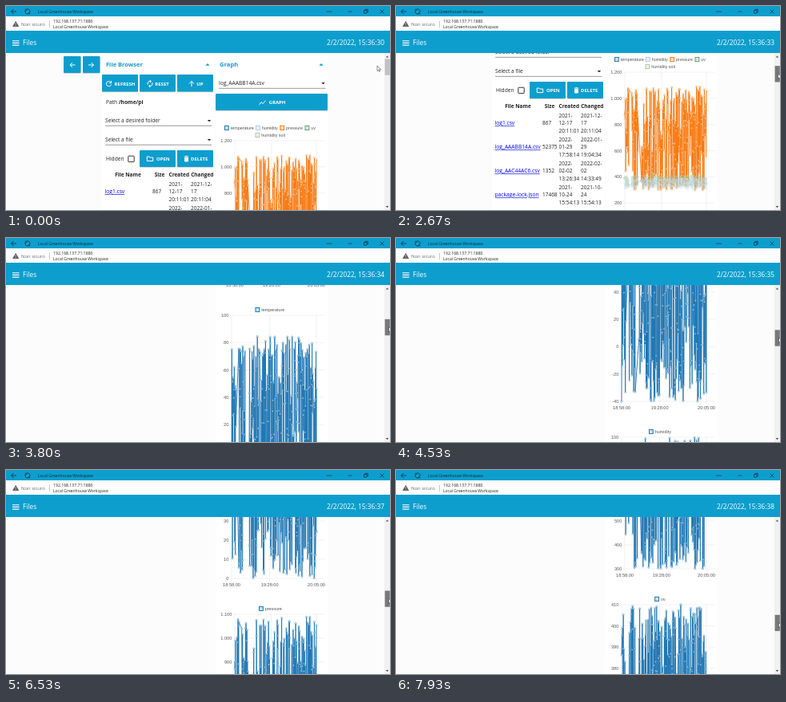
Write an HTML page that moves like this. It is 480x256 px and loops after 8000 ms.

```html
<!DOCTYPE html>
<html lang="en">
<head>
<meta charset="utf-8">
<title>Files</title>
<style>
  html, body { margin: 0; width: 100%; height: 100%; overflow: hidden; background: #fcfcfc; }
  svg { display: block; width: 480px; height: 256px; }
  text { font-family: "Open Sans", "Noto Sans", sans-serif; }
  .chart text { font-family: "Liberation Sans", Arial, sans-serif; }
</style>
</head>
<body>
<svg id="stage" viewBox="0 0 480 256"></svg>
<script>
const BLUE = '#0e9ecd', INK = '#222';

// ---------- drawing helpers ----------
const rect = (x, y, w, h, fill, extra = '') =>
  `<rect x="${x}" y="${y}" width="${w}" height="${h}" fill="${fill}" ${extra}/>`;
const path = (d, stroke, width = 1, fill = 'none', extra = '') =>
  `<path d="${d}" stroke="${stroke}" stroke-width="${width}" fill="${fill}" ${extra}/>`;
const icon = (x, y, d, stroke, width = 1, fill = 'none') =>
  path(d, stroke, width, fill, `transform="translate(${x} ${y})"`);
// y is the visual middle of the line
const text = (x, y, str, size = 6.66, fill = INK, extra = '') =>
  `<text x="${x}" y="${y + size * 0.35}" font-size="${size}" fill="${fill}" ${extra}>${str}</text>`;
const BOLD = 'font-weight="700"', MEDIUM = 'font-weight="500"';
const MID = 'text-anchor="middle"', END = 'text-anchor="end"';

const button = (x, y, w, h) =>
  rect(x, y + 0.8, w, h, '#000', 'rx="1" opacity=".2"') + rect(x, y, w, h, BLUE, 'rx="1"');
const label = (x, y, str) => text(x, y, str, 6, '#fff', `${BOLD} ${MID}`);
const dropdown = (x, y, right, str) =>
  text(x, y, str) + path(`M${x} ${y + 6.3}H${right}`, '#555', 0.6) +
  icon(right - 3, y, 'M-2.2-1H2.2L0 1.3Z', 'none', 0, '#222');

// ---------- sensor data ----------
let seed = 7;
const random = () => (seed = (seed * 16807) % 2147483647) / 2147483647;
// recording sessions as fractions of the time axis, with pauses between them
const SESSIONS = [[0, 0.05], [0.085, 0.16], [0.205, 1]], SPACING = 0.0026;
const times = SESSIONS.flatMap(([from, to]) =>
  Array.from({ length: Math.round((to - from) / SPACING) + 1 }, (_, i) => from + i * SPACING));
const makeSeries = (name, color, low, high) =>
  ({ name, color, points: times.map(t => [t, low + (high - low) * random()]) });
const temperature = makeSeries('temperature', '#1f77b4', -40, 85);
const humidity = makeSeries('humidity', '#aec7e8', 0, 100);
const pressure = makeSeries('pressure', '#f97b14', 300, 1100);
const uv = makeSeries('uv', '#2ca02c', 330, 410);
const soil = makeSeries('humidity soil', '#b4d8b4', 310, 390);

// ---------- charts ----------
function plot(series, color, toX, toY, width, opacity = 1) {
  const xy = series.points.map(([t, v]) => [toX(t).toFixed(1), toY(v).toFixed(1)]);
  const dots = xy.map(([x, y]) => `<circle cx="${x}" cy="${y}" r="1.15"/>`).join('');
  return `<g opacity="${opacity}">` +
    path('M' + xy.map(p => p.join(' ')).join('L'), color, width, 'none', 'stroke-linejoin="bevel"') +
    `<g fill="#fff" fill-opacity=".5" stroke="${color}" stroke-width=".4">${dots}</g></g>`;
}

function legend(x, y, name, color) {
  return rect(x, y - 2.6, 4.8, 5.2, color, `fill-opacity=".22" stroke="${color}" stroke-width="1"`) +
    text(x + 7.3, y, name, 5.4, '#555');
}

function axes({ top, bottom, left, high, low, step }) {
  const toY = v => top + (high - v) / (high - low) * (bottom - top);
  const toX = t => left + t * (388 - left);
  const ticks = [['18:58:00', left], ['19:28:00', left + (388 - left) * 0.45], ['20:05:00', 388]];
  let out = '';
  for (let v = high; v >= low; v -= step) {
    const name = v >= 1000 ? (v / 1000).toFixed(3) : v;
    out += path(`M${left - 3} ${toY(v)}H399`, '#e6e6e6', 0.5) +
      text(left - 3.7, toY(v), name, 5.6, '#555', END);
  }
  for (const [name, x] of ticks)
    out += path(`M${x} ${top}V${bottom + 3}`, '#e2e2e2', 0.5) + text(x, bottom + 8, name, 5.6, '#555', MID);
  return { out, toX, toY };
}

function singleChart(series, legendX, frame) {
  const { out, toX, toY } = axes({ ...frame, bottom: frame.top + 240 });
  return out + legend(legendX, frame.top - 7, series.name, '#1f77b4') +
    plot(series, '#1f77b4', toX, toY, 0.9);
}

function combinedChart() {
  const { out, toX, toY } = axes({ top: 169, bottom: 399, left: 286, high: 1200, low: -200, step: 200 });
  return out +
    legend(273.5, 153, 'temperature', temperature.color) + legend(312.4, 153, 'humidity', humidity.color) +
    legend(342.8, 153, 'pressure', pressure.color) + legend(374, 153, 'uv', '#5f9f78') +
    legend(312, 162, 'humidity soil', '#b5c4ab') +
    plot(temperature, temperature.color, toX, toY, 0.8) +
    plot(humidity, humidity.color, toX, toY, 0.8) +
    plot(pressure, pressure.color, toX, toY, 0.9) +
    plot(uv, '#6da56d', toX, toY, 0.4, 0.6) +
    plot(soil, '#a9cbe0', toX, toY, 0.4, 0.6);
}

// ---------- page ----------
const ARROW_LEFT = 'M3.5 0H-3M0-3L-3 0 0 3';
const files = [
  ['log1.csv', 867, '2021- 12-17 20:11:01', '2021-12- 17 20:11:04'],
  ['log_AAABB14A.csv', 52375, '2022- 01-29 17:58:14', '2022-01- 29 19:04:34'],
  ['log_AAC44AC6.csv', 1352, '2022- 02-02 13:26:34', '2022-02- 02 14:33:49'],
  ['package-lock.json', 17468, '2021- 10-24 15:54:13', '2021-10- 24 15:54:13']
];

function fileTable() {
  const head = [['File Name', 152.5], ['Size', 192], ['Created', 216.3], ['Changed', 245.3]];
  const lines = (x, y, str) => str.split(' ').map((s, i) => text(x, y + (i - 1) * 9.6, s, 6.5)).join('');
  return head.map(([s, x]) => text(x, 212, s, 6.5, INK, `${BOLD} ${MID}`)).join('') +
    files.map(([name, size, created, changed], i) => {
      const y = 233 + i * 30;
      return text(123.5, y, name, 6.7, '#0000ee', 'text-decoration="underline"') +
        text(183, y, size, 6.5) + lines(203.5, y, created) + lines(231, y, changed);
    }).join('');
}

function fileBrowser() {
  return rect(120, 59, 141, 286, '#fff') +
    button(72, 63, 21.5, 21) + icon(83, 74, ARROW_LEFT, '#fff') +
    button(96, 63, 21.5, 21) + icon(106.5, 74, 'M-3.5 0H3M0-3L3 0 0 3', '#fff') +
    text(125, 73, 'File Browser', 7.5, BLUE, BOLD) + icon(252, 73.5, 'M-2.6 1.3H2.6L0-1.4Z', 'none', 0, BLUE) +
    button(120, 86, 45, 21.5) + icon(128.5, 97.5, 'M2.3-2A3.1 3.1 0 1 0 3 1M3-3.6V-.9H.4', '#fff') + label(148.5, 97.5, 'REFRESH') +
    button(167, 86, 45, 21.5) +
    icon(180, 97.5, 'M-2.7 1.3A3 3 0 0 1 1-2.9M2.7-1.3A3 3 0 0 1-1 2.9M-.2-4.6L1.4-2.9-.2-1.3M.2 4.6L-1.4 2.9 .2 1.3', '#fff') +
    label(195, 97.5, 'RESET') +
    button(214, 86, 45, 21.5) + icon(232, 97.5, 'M0 3.7V-3M-3 0L0-3 3 0', '#fff') + label(242.3, 97.5, 'UP') +
    text(125, 121, `Path <tspan ${BOLD}>/home/pi</tspan>`) +
    dropdown(124, 144, 257, 'Select a desired folder') +
    dropdown(124, 168, 257, 'Select a file') +
    text(125, 192, 'Hidden') + rect(152.8, 188.2, 7.4, 7.4, '#fff', 'rx=".6" stroke="#333" stroke-width="1"') +
    button(167, 181, 45, 21) + icon(180, 191.7, 'M-3.7-2.7H-1L0-1.6H3.7V2.8H-3.7Z', '#fff') + label(196.3, 192, 'OPEN') +
    button(214, 181, 45, 21) + icon(225.5, 191.5, 'M-2-.9H2V3.5H-2ZM-2.8-2.4H2.8M-1-3.2H1', '#fff', 0.9, '#fff') + label(241.7, 192, 'DELETE') +
    fileTable();
}

function graphColumn() {
  return rect(262, 59, 140, 1600, '#fff') +
    text(267, 73, 'Graph', 7.6, BLUE, BOLD) + icon(394, 73.5, 'M-2.6 1.3H2.6L0-1.4Z', 'none', 0, BLUE) +
    dropdown(266, 97, 399.5, 'log_AAABB14A.csv') +
    button(262, 110, 140, 21) + icon(320.5, 121.3, 'M-4 2.5L-1.4-.6 .6 1.3 4-2.6', '#fff') + label(339, 121, 'GRAPH') +
    '<g class="chart">' + combinedChart() +
    singleChart(temperature, 312, { top: 445, left: 282, high: 100, low: -40, step: 20 }) +
    singleChart(humidity, 316.5, { top: 730, left: 282, high: 100, low: 0, step: 10 }) +
    singleChart(pressure, 316.5, { top: 1015, left: 286, high: 1100, low: 300, step: 100 }) +
    singleChart(uv, 323.7, { top: 1300, left: 282, high: 410, low: 320, step: 10 }) + '</g>';
}

function browserFrame() {
  const dark = '#0b2e3c', site = 'Local Greenhouse Workspace';
  return rect(0, 0, 480, 13, BLUE) + rect(0, 13, 480, 18, '#fff') + rect(0, 31, 480, 28, BLUE) +
    icon(9.5, 7, ARROW_LEFT, dark, 0.8) +
    icon(27, 7, 'M-2.2-2.3A3.2 3.2 0 0 0 1 3M2.2 2.3A3.2 3.2 0 0 0-1-3M-3-2.8H-1.6V-1.2M3 2.8H1.6V1.2', dark, 0.8) +
    text(40, 7, site, 5, dark) +
    [401.2, 403.7, 406.2].map(x => `<circle cx="${x}" cy="7" r=".7" fill="${dark}"/>`).join('') +
    path('M427.5 7H432.5M447.5 5.5H451V9H447.5ZM448.8 5.3V4.3H452.3V7.8H451.2M467.5 4.5L472.5 9.5M472.5 4.5L467.5 9.5', dark, 0.7) +
    icon(12.2, 22.7, 'M0-3.5L3.8 3H-3.8Z', '#555', 0.4, '#555') + path('M12.2 21.5V23.4M12.2 24.2V25', '#fff', 0.8) +
    text(19, 22.5, 'Non sicuro', 5.9, '#666') + path('M54.4 18.5V27', '#999', 0.6) +
    text(59, 19.2, '192.168.137.71:1880', 5.15) + text(59, 26.3, site, 5) +
    path('M8 43.7H16.5M8 46.4H16.5M8 49.1H16.5', '#fff', 1.1) +
    text(21, 46.2, 'Files', 8.3, '#fff', MEDIUM) +
    text(473, 46.2, '', 8.35, '#fff', `id="clock" ${MEDIUM} ${END}`);
}

const scrollbar = rect(473, 59, 7, 197, '#f1f1f1') +
  path('M474.7 64.6H478.3L476.5 62.4ZM474.7 251H478.3L476.5 253.2Z', 'none', 0, '#505050') +
  rect(473.6, 0, 6.2, 20.3, '#c1c1c1', 'id="thumb"');
const cursor = path('M0 0V6.6L1.5 5.2 2.5 7.5 3.5 7.1 2.5 4.8H4.6Z', '#222', 0.5, '#fff', 'id="cursor"');

stage.innerHTML = rect(0, 0, 480, 256, '#fcfcfc') +
  `<g id="page">${fileBrowser()}${graphColumn()}</g>` + browserFrame() + scrollbar + cursor;
const [page, clock, thumb, pointer] = ['page', 'clock', 'thumb', 'cursor'].map(id => document.getElementById(id));

// ---------- motion ----------
const LOOP = 8000, FRAME = 1000 / 15, DRAG_START = 2130;
const scrollKeys = [[DRAG_START, 0], [2667, 86], [3800, 348], [5333, 624], [6533, 834], [7933, 1131], [8000, 1145]];
const pointerX = [[900, 464], [1500, 477.5], [2667, 477.5], [3800, 478.5]];
const pointerY = [[900, 75], [1500, 73.5], [1733, 74], [2000, 76]];

function at(keys, t) {
  if (t <= keys[0][0]) return keys[0][1];
  const next = keys.findIndex(k => k[0] >= t);
  if (next < 0) return keys[keys.length - 1][1];
  const [t0, a] = keys[next - 1], [t1, b] = keys[next];
  return a + (b - a) * (t - t0) / (t1 - t0);
}

function render(now) {
  const t = Math.floor((now % LOOP + 4) / FRAME) * FRAME;
  const scroll = at(scrollKeys, t), drag = scroll / 9.8;
  const x = at(pointerX, t), y = at(pointerY, t) + drag;
  page.setAttribute('transform', `translate(0 ${-scroll})`);
  thumb.setAttribute('y', 66.4 + drag);
  thumb.setAttribute('fill', t >= DRAG_START ? '#787878' : x > 473 ? '#a8a8a8' : '#c1c1c1');
  pointer.setAttribute('transform', `translate(${x} ${y})`);
  clock.textContent = `2/2/2022, 15:36:${30 + Math.floor((t + 470) / 1000)}`;
  requestAnimationFrame(render);
}
requestAnimationFrame(render);
</script>
</body>
</html>
```
